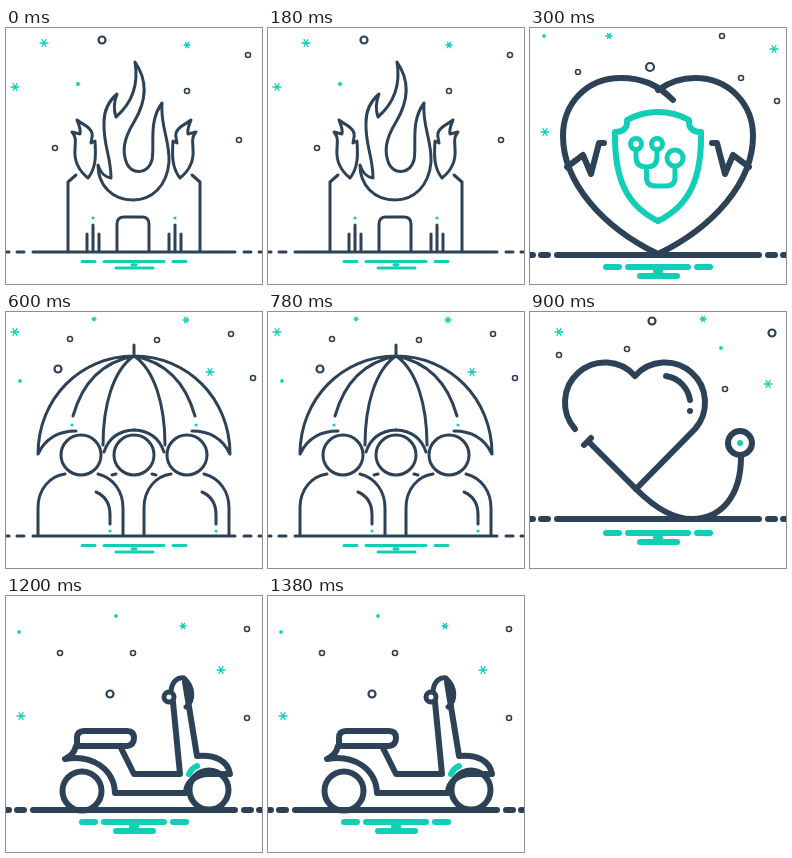
An HTML page that plays this animation: 256x256 px, repeating every 1500 ms.

```html
<!DOCTYPE html>
<html lang="en">
<head>
<meta charset="utf-8">
<title>Icon loop</title>
<style>
  html, body { margin: 0; width: 100%; height: 100%; overflow: hidden; background: #fff; }
  svg { display: block; width: 100vw; height: 100vh; }
  path, circle { fill: none; stroke: #2e4257; stroke-linecap: round; stroke-linejoin: round; }
  .teal { stroke: #10cfb6; }
  .dot { fill: #10cfb6; stroke: none; }
  .dark-dot { fill: #2e4257; stroke: none; }
  .white { fill: #fff; }
  .scene { visibility: hidden; }
</style>
</head>
<body>
<svg id="stage" viewBox="0 0 256 256"></svg>
<script>
const STEP = 300;
const stage = document.getElementById('stage');

const path = (d, cls = '') => `<path class="${cls}" d="${d}"/>`;
const ring = (x, y, r, cls = '') => `<circle class="${cls}" cx="${x}" cy="${y}" r="${r}"/>`;
const mirror = (art) => art + `<g transform="matrix(-1 0 0 1 256 0)">${art}</g>`;

function ground(y, tealY, lowY) {
  return path(`M1 ${y}H3M11 ${y}H18M27 ${y}H229M238 ${y}H245M253 ${y}H255`) +
    path(`M76 ${tealY}H89M98 ${tealY}H158M167 ${tealY}H180M110 ${lowY}H147M126 ${(tealY + lowY) / 2}H130`, 'teal');
}

function star([x, y, r]) {
  let d = '';
  for (let i = 0; i < 3; i++) {
    const a = i * Math.PI / 3;
    const dx = r * Math.cos(a), dy = r * Math.sin(a);
    d += `M${x - dx} ${y - dy}L${x + dx} ${y + dy}`;
  }
  return path(d, 'teal');
}

function confetti(stars, rings) {
  return `<g stroke-width="1.3">${stars.map(star).join('')}</g>` +
    rings.map(([x, y, r = 2.5]) => `<g stroke-width="${r > 3 ? 2.2 : 1.6}">${ring(x, y, r)}</g>`).join('');
}

const flames = {
  width: 3,
  stars: [[38, 15, 4], [9, 59, 4], [72, 56, 1.6], [181, 17, 3]],
  rings: [[96, 12, 3.5], [242, 27], [181, 63], [49, 120], [233, 112]],
  art: ground(224, 233.5, 240) +
    path('M129 34C143 54 140 74 128 94C117 112 116 124 121 136C127 147 142 146 146 132C149 117 142 94 156 75C154 98 164 112 163 134C161 158 146 172 127 172C106 172 92 157 92 137C95 146 99 149 105 150C105 128 97 117 98 94C98 81 104 72 111 66C107 76 108 83 110 89C126 75 133 58 129 34Z') +
    mirror(
      path('M71 92C77 97 84 98 86 105C87 109 85 113 85 115L89 113C90 128 90 140 82 150C72 142 68 132 69 121C69 115 71 110 66 104L74 106C75 101 73 97 71 92Z') +
      path('M70 147L62 154V223M81 206V222M87 197V222M93 206V222') +
      ring(87, 190, 1.6, 'dot')) +
    path('M111 223V196Q111 189 118 189H136Q143 189 143 196V223')
};

const heartShield = {
  width: 6,
  stars: [[14, 8, 1.4], [79, 8, 3], [244, 21, 4], [15, 104, 4]],
  rings: [[48, 44], [120, 39, 4], [192, 8], [211, 50], [247, 73]],
  art: ground(227, 239, 248) +
    path('M143 72C128 57 113 50 91 50C56 50 33 76 33 108C33 154 72 199 128 226C184 199 223 154 223 108C223 76 199 50 165 50C150 50 138 55 128 62') +
    mirror(path('M37 139L53 127L61 146L69 115H74') +
      path('M128 84C116 84 106 87 97 92C98 101 92 104 85 104C84 151 97 178 128 193', 'teal')) +
    `<g stroke-width="5">` +
    ring(106, 116, 5.5, 'teal') + ring(127, 116, 5.5, 'teal') + ring(145, 130, 8, 'teal') +
    path('M106 122V129Q106 139 116.5 139T127 129V122M116.5 139V149Q116.5 158 125 158H136Q145 158 145 149V139', 'teal') +
    `</g>`
};

const person = path('M32 223V196C32 177 44 164 59 162M92 162C108 166 117 180 117 196V223M90 180Q104 186 104 203V212') +
  ring(104, 219, 1.6, 'dot');

const umbrella = {
  width: 3,
  stars: [[9, 20, 4], [88, 7, 2], [180, 8, 3], [204, 60, 4], [14, 69, 1.4]],
  rings: [[64, 27], [52, 57, 3.5], [151, 28], [225, 22], [247, 66]],
  art: ground(224, 233.5, 240) +
    path('M128 33V44') +
    mirror(
      path('M128 44C74 44 32 87 32 142Q43 119 70 119M128 44C96 50 76 72 67 104M128 44C107 58 97 94 97 133M98 140Q105 119 128 118M106 163L110 162') +
      ring(66, 113, 1.6, 'dot')) +
    ring(128, 143, 20, 'white') + ring(75, 143, 20, 'white') + ring(181, 143, 20, 'white') +
    person + `<g transform="translate(106 0)">${person}</g>`
};

const stethoscope = {
  width: 6,
  stars: [[29, 20, 4], [173, 7, 3], [191, 36, 1.4], [238, 72, 4]],
  rings: [[122, 9, 3.5], [29, 43], [97, 37], [242, 21, 3.5], [195, 77]],
  art: ground(207, 221, 230) +
    path('M45 117A40 40 0 1 1 105 64A40 40 0 1 1 165 117L106 177') +
    path('M54 133L61 126M58 129L106 177C126 197 145 207 162 207C191 207 211 184 211 145') +
    path('M136 64C149 66 158 76 160 88') + ring(160, 99, 3, 'dark-dot') +
    ring(210, 131, 12) + ring(210, 131, 3, 'dot')
};

const scooter = {
  width: 6,
  stars: [[13, 36, 1.4], [110, 20, 1.4], [177, 30, 3], [215, 74, 4], [15, 120, 4]],
  rings: [[54, 57], [127, 57], [104, 98, 3.5], [241, 33], [241, 122]],
  art: ground(214, 226, 235) +
    ring(76, 195, 19.5) + ring(203, 194, 19.5) +
    path('M78 135H121Q128 135 128 142T121 150H71V142Q71 135 78 135Z') +
    path('M70 150Q68 159 59 163C86 158 108 173 109 197H180C180 186 190 178 203 178H224C222 165 209 158 191 160L179 86') +
    path('M114 150L128 178H174L167 106') +
    `<g stroke-width="5">` + ring(163, 101, 5) +
    path('M165 95C166 85 172 81 178 82C188 91 188 105 180 111') + `</g>` +
    path('M183 178Q186 172 191 170', 'teal')
};

const scenes = [flames, heartShield, umbrella, stethoscope, scooter];
stage.innerHTML = scenes.map(({ width, stars, rings, art }) =>
  `<g class="scene" stroke-width="${width}">${confetti(stars, rings)}${art}</g>`).join('');
const groups = [...stage.querySelectorAll('.scene')];

const start = performance.now();
function draw(now) {
  const current = Math.floor(Math.max(0, now - start) / STEP) % groups.length;
  groups.forEach((g, i) => { g.style.visibility = i === current ? 'visible' : 'hidden'; });
  requestAnimationFrame(draw);
}
draw(start);
</script>
</body>
</html>
```
